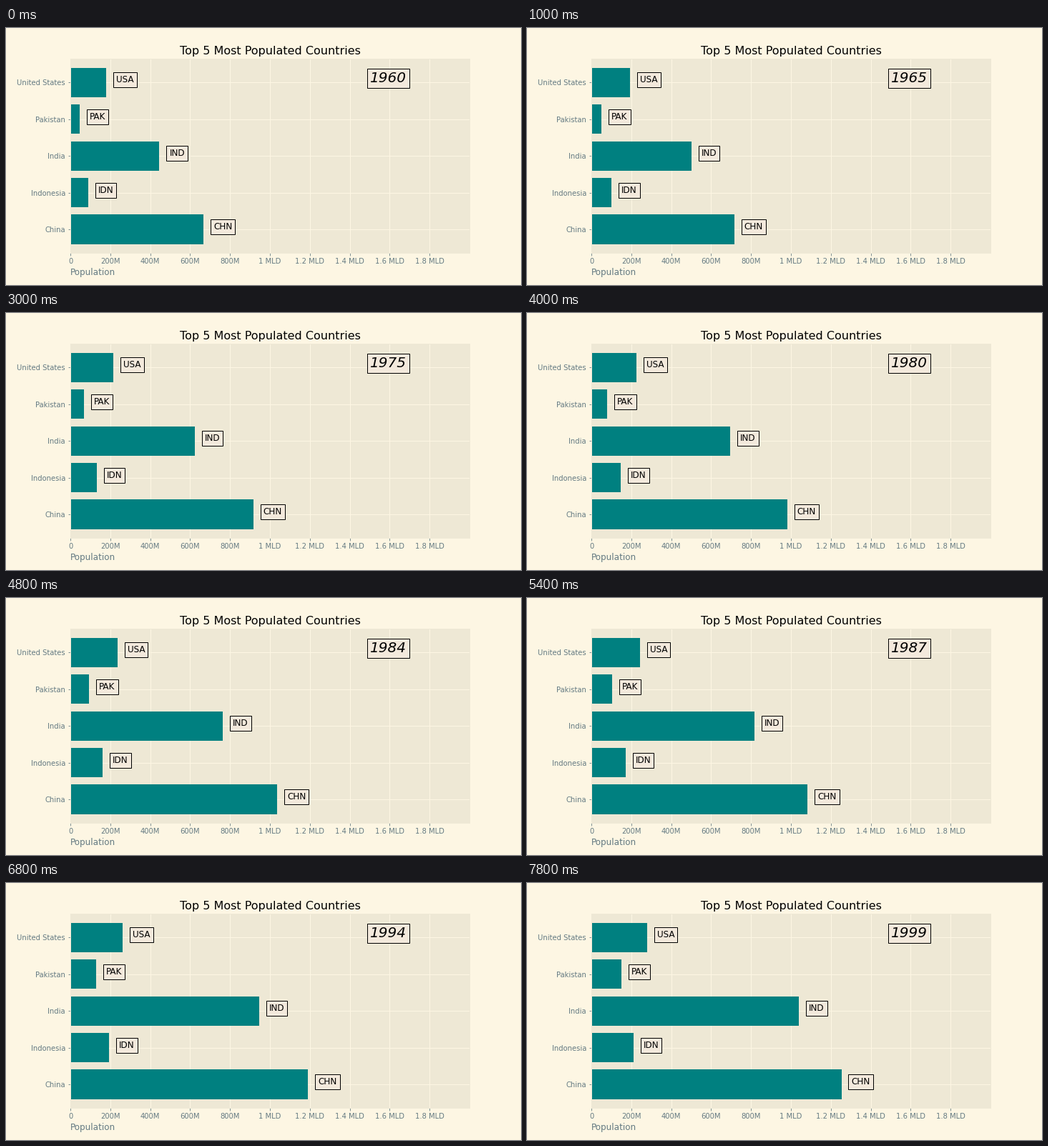
Animation of 720 by 360 pixels, one loop 8 s. Source, as a matplotlib script:

```python
import numpy as np
import matplotlib.pyplot as plt
from matplotlib.animation import FuncAnimation

PAPER, PANEL, INK, TEAL, TAG = "#fdf6e3", "#eee8d5", "#657b83", "#008080", "#f3e9dc"
START, YEARS = 1960, 40

plt.rcParams.update({
    "font.family": "DejaVu Sans",
    "font.size": 10,
    "figure.facecolor": PAPER,
    "axes.facecolor": PANEL,
    "axes.edgecolor": PANEL,
    "axes.linewidth": 1.0,
    "axes.labelcolor": INK,
    "axes.labelsize": 12,
    "axes.titlesize": 16,
    "axes.axisbelow": True,
    "axes.grid": True,
    "grid.color": PAPER,
    "grid.linestyle": "-",
    "grid.linewidth": 1,
    "xtick.color": INK,
    "ytick.color": INK,
})

# Population in millions at key years (years counted from 1900)
COUNTRIES = [
    ("China", "CHN",
     [60, 61, 62, 63, 65, 68, 71, 73, 75, 77, 80, 81, 84, 87, 90, 92, 95, 97, 99],
     [667.1, 660.3, 665.8, 682.3, 715.2, 774.5, 841.1, 881.9, 916.4, 943.5,
      981.2, 993.9, 1036.8, 1084.0, 1135.2, 1165.0, 1204.9, 1230.1, 1252.7]),
    ("Indonesia", "IDN",
     [60, 65, 71, 75, 80, 87, 90, 94, 99],
     [88.3, 100.3, 118.2, 131.2, 148.2, 171.8, 182.2, 194.2, 211.0]),
    ("India", "IND",
     [60, 65, 68, 71, 75, 80, 85, 90, 95, 99],
     [446.0, 500.1, 533.4, 570.0, 623.5, 696.8, 780.2, 870.5, 964.3, 1040.5]),
    ("Pakistan", "PAK",
     [60, 65, 71, 75, 80, 82, 87, 90, 94, 99],
     [46.0, 51.4, 60.9, 68.3, 80.2, 87.6, 104.0, 115.4, 129.0, 150.2]),
    ("United States", "USA",
     [60, 65, 70, 71, 75, 80, 85, 90, 92, 95, 99],
     [180.7, 194.3, 205.1, 207.7, 216.0, 227.2, 237.9, 249.6, 256.5, 266.3, 279.0]),
]

years = np.arange(START, START + YEARS)
people = np.array([np.interp(years - 1900, when, count)
                   for _, _, when, count in COUNTRIES])


def tick_text(millions):
    if millions == 0:
        return "0"
    return f"{millions}M" if millions < 1000 else f"{millions / 1000:g} MLD"


fig = plt.figure(figsize=(10, 5), dpi=72)
fig.subplots_adjust(left=0.125, right=0.9, bottom=0.125, top=0.88)
ax = fig.add_subplot()

bars = ax.barh([c[0] for c in COUNTRIES], people[:, 0], color=TEAL)
ax.set_xlim(0, 2000)
ax.set_ylim(-0.64, 4.64)
ticks = range(0, 2000, 200)
ax.set_xticks(ticks, [tick_text(t) for t in ticks])
ax.set_title("Top 5 Most Populated Countries", color="black")
ax.set_xlabel("Population", loc="left")


def boxed(x, y, text, **style):
    box = dict(facecolor=TAG, edgecolor="black", linewidth=1, pad=4)
    return ax.text(x, y, text, color="black", bbox=box, **style)


tags = [boxed(0, i, c[1], fontsize=12) for i, c in enumerate(COUNTRIES)]
year_tag = boxed(1500, 4, str(START), fontsize=20, style="italic")


def draw(i):
    for bar, tag, value in zip(bars, tags, people[:, i]):
        bar.set_width(value)
        tag.set_x(value + 50)
    year_tag.set_text(str(years[i]))
    return [*bars, *tags, year_tag]


anim = FuncAnimation(fig, draw, frames=YEARS, interval=200, repeat=True)
plt.show()
```
